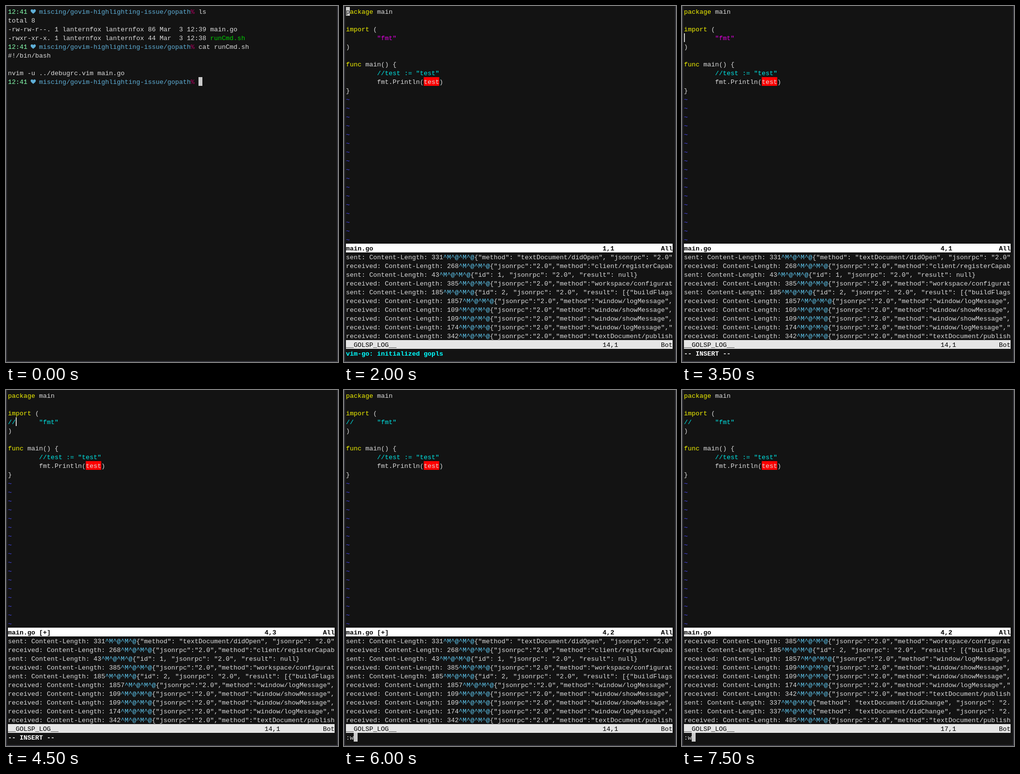
An HTML page with a canvas for the animation above (8 s loop, 683 by 731 pixels).

```html
<!DOCTYPE html>
<html lang="en">
<head>
<meta charset="utf-8">
<title>Terminal session</title>
<style>
  html, body { margin: 0; width: 100%; height: 100%; overflow: hidden; background: #131313; }
  canvas { display: block; }
</style>
</head>
<body>
<canvas id="screen" width="683" height="731"></canvas>
<script>
const ctx = document.getElementById('screen').getContext('2d');
const LOOP = 8000, CELL_W = 8, CELL_H = 18, LEFT = 4, TOP = 2, BASELINE = 14, COLS = 84;
// Glyphs are 0.6 em wide, so this size makes one character fill one cell.
const FONT = `${CELL_W / 0.6}px "Liberation Mono", monospace`;
const color = {
  back: '#131313', text: '#dcdcdc', border: '#33333b', cursor: '#cccccc',
  time: '#87ffaf', path: '#5fafd7', percent: '#af005f', exec: '#00cd00',
  keyword: '#f2f200', string: '#e000e0', comment: '#00e5e5', tilde: '#4646f0',
  control: '#5fc8f0', error: '#ff0000', message: '#00ffff',
  active: '#ffffff', inactive: '#e5e5e5', dark: '#000000'
};

const x = col => LEFT + col * CELL_W;
const y = row => TOP + row * CELL_H;

function fill(row, col, cells, style) {
  ctx.fillStyle = style;
  ctx.fillRect(x(col), y(row), cells * CELL_W, CELL_H);
}

function print(row, col, text, style = color.text, bold = false) {
  ctx.font = bold ? `bold ${FONT}` : FONT;
  ctx.fillStyle = style;
  ctx.fillText(text.slice(0, COLS - col), x(col), y(row) + BASELINE);
}

function blockCursor(row, col, char = '') {
  fill(row, col, 1, color.cursor);
  print(row, col, char, color.back);
}

function barCursor(row, col) {
  ctx.fillStyle = color.cursor;
  ctx.fillRect(x(col), y(row), 2, CELL_H);
}

function heart(row) {
  ctx.save();
  ctx.translate(56, y(row) + 5);
  ctx.fillStyle = color.path;
  ctx.fill(new Path2D('M0 9 C-2 7 -5.3 5 -5.3 2.5 C-5.3 -.6 -1.3 -1 0 1.5 C1.3 -1 5.3 -.6 5.3 2.5 C5.3 5 2 7 0 9Z'));
  ctx.restore();
}

function prompt(row, command) {
  print(row, 0, '12:41', color.time);
  heart(row);
  print(row, 8, 'miscing/govim-highlighting-issue/gopath', color.path);
  print(row, 47, '%', color.percent);
  print(row, 49, command);
}

function drawShell(command) {
  const owner = 'lanternfox lanternfox';
  prompt(0, 'ls');
  print(1, 0, 'total 8');
  print(2, 0, `-rw-rw-r--. 1 ${owner} 86 Mar  3 12:39 main.go`);
  print(3, 0, `-rwxr-xr-x. 1 ${owner} 44 Mar  3 12:38`);
  print(3, 52, 'runCmd.sh', color.exec);
  prompt(4, 'cat runCmd.sh');
  print(5, 0, '#!/bin/bash');
  print(7, 0, 'nvim -u ../debugrc.vim main.go');
  prompt(8, command);
  blockCursor(8, 49 + command.length);
}

const sent = (length, body) => [`sent: Content-Length: ${length}`, body];
const received = (length, method) =>
  [`received: Content-Length: ${length}`, `{"jsonrpc":"2.0","method":"${method}`];
const didChange = sent(337, '{"method": "textDocument/didChange", "jsonrpc": "2.0"');
const log = [
  sent(331, '{"method": "textDocument/didOpen", "jsonrpc": "2.0"'),
  received(268, 'client/registerCapability"'),
  sent(43, '{"id": 1, "jsonrpc": "2.0", "result": null}'),
  received(385, 'workspace/configuration"'),
  sent(185, '{"id": 2, "jsonrpc": "2.0", "result": [{"buildFlags"'),
  received(1857, 'window/logMessage",'),
  received(109, 'window/showMessage",'),
  received(109, 'window/showMessage",'),
  received(174, 'window/logMessage","'),
  received(342, 'textDocument/publishDiagnostics"'),
  didChange,
  didChange,
  received(485, 'textDocument/publishDiagnostics"')
];

function drawLog(scroll) {
  const control = '^M^@^M^@';
  log.slice(scroll, scroll + 10).forEach(([head, body], i) => {
    print(28 + i, 0, head);
    print(28 + i, head.length, control, color.control);
    print(28 + i, head.length + control.length, body);
  });
}

function statusLine(row, name, ruler, position, style, bold) {
  fill(row, 0, COLS, style);
  print(row, 0, name, color.dark, bold);
  print(row, 66, ruler, color.dark, bold);
  print(row, 81, position, color.dark, bold);
}

function drawCode(slashes) {
  const disabled = slashes === '//';
  print(0, 0, 'package', color.keyword);
  print(0, 8, 'main');
  print(2, 0, 'import', color.keyword);
  print(2, 7, '(');
  print(3, 0, slashes, disabled ? color.comment : color.text);
  print(3, 8, '"fmt"', disabled ? color.comment : color.string);
  print(4, 0, ')');
  print(6, 0, 'func', color.keyword);
  print(6, 5, 'main() {');
  print(7, 8, '//test := "test"', color.comment);
  print(8, 8, 'fmt.Println(');
  fill(8, 20, 4, color.error);
  print(8, 20, 'test');
  print(8, 24, ')');
  print(9, 0, '}');
  for (let row = 10; row < 27; row++) print(row, 0, '~', color.tilde);
}

function drawEditor({ slashes = '', ruler, modified, scroll = 0, message = '', style, bold, cursor }) {
  drawCode(slashes);
  statusLine(27, modified ? 'main.go [+]' : 'main.go', ruler, 'All', color.active, true);
  drawLog(scroll);
  statusLine(38, '__GOLSP_LOG__', `${14 + scroll},1`, 'Bot', color.inactive);
  print(39, 0, message, style, bold);
  cursor();
}

const ready = { message: 'vim-go: initialized gopls', style: color.message, bold: true };
const insert = { message: '-- INSERT --', style: color.active, bold: true };
const commented = { slashes: '//', ruler: '4,2' };
const edited = { ...commented, modified: true };
const saved = { ...commented, scroll: 3 };
const onSlash = () => blockCursor(3, 1, '/');
const commandLine = message => ({ message, cursor: () => blockCursor(39, message.length) });
const editor = state => () => drawEditor(state);

const timeline = [
  [0, () => drawShell('')],
  [1000, () => drawShell('./runCmd.sh')],
  [2000, editor({ ...ready, ruler: '1,1', cursor: () => blockCursor(0, 0, 'p') })],
  [2500, editor({ ...ready, ruler: '4,1-8', cursor: () => blockCursor(3, 7) })],
  [3000, editor({ ...insert, ruler: '4,1', cursor: () => barCursor(3, 0) })],
  [4000, editor({ ...insert, slashes: '/', ruler: '4,2', modified: true, cursor: () => barCursor(3, 1) })],
  [4500, editor({ ...insert, ...edited, ruler: '4,3', cursor: () => barCursor(3, 2) })],
  [5000, editor({ ...edited, cursor: onSlash })],
  [5500, editor({ ...edited, ...commandLine(':') })],
  [6000, editor({ ...edited, ...commandLine(':w') })],
  [6500, editor({ ...saved, message: '"main.go" 10L, 88C written', cursor: onSlash })],
  [7000, editor({ ...saved, ...commandLine(':') })],
  [7500, editor({ ...saved, ...commandLine(':w') })]
];

function frame() {
  const time = performance.now() % LOOP;
  ctx.fillStyle = color.border;
  ctx.fillRect(0, 0, 683, 731);
  ctx.fillStyle = color.back;
  ctx.fillRect(2, 0, 679, 729);
  timeline.filter(([start]) => start <= time).pop()[1]();
  requestAnimationFrame(frame);
}
frame();
</script>
</body>
</html>
```
